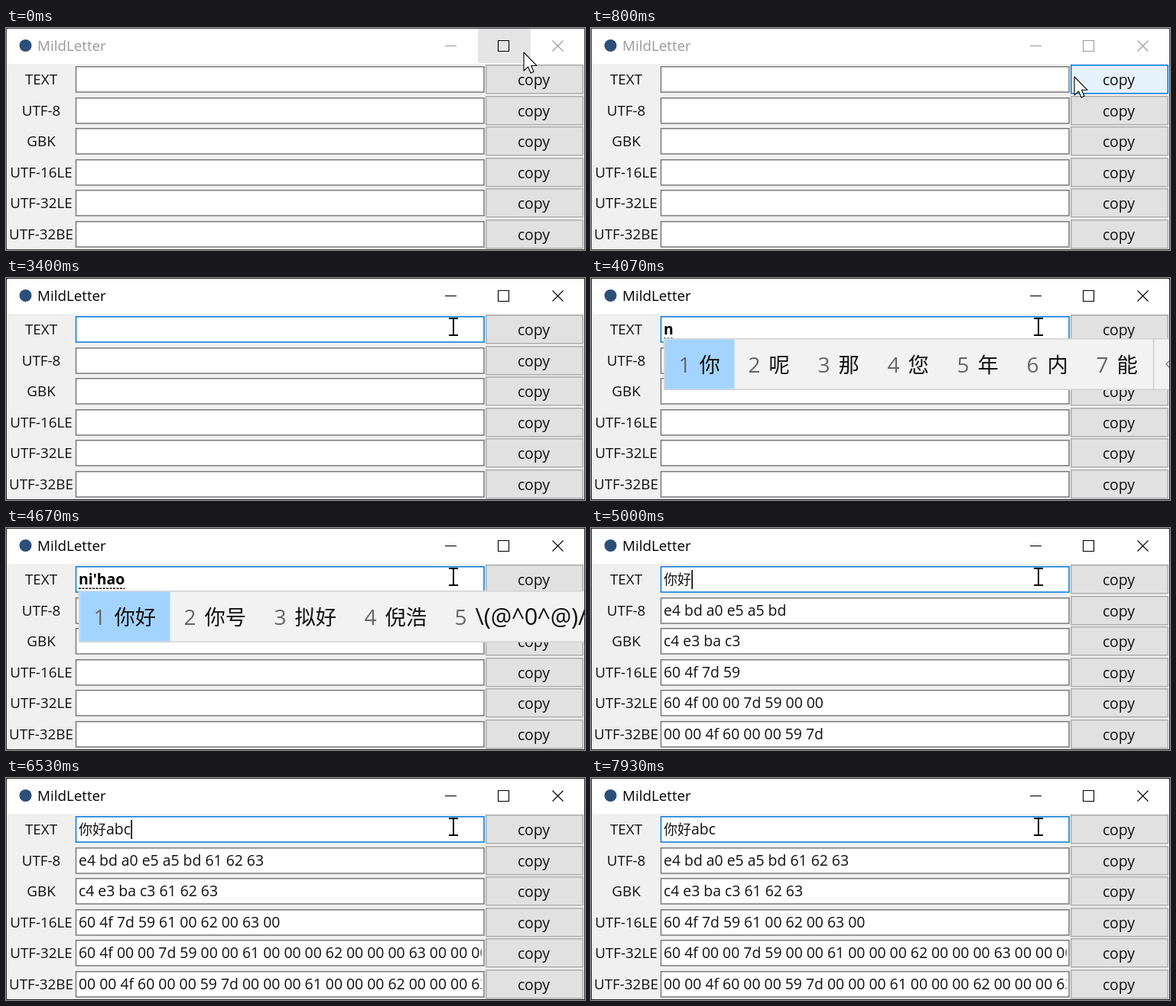
Recreate the animation shown at these times as an HTML page. Size 757 by 291 pixels, loop 8000 ms.

```html
<!DOCTYPE html>
<html lang="en">
<head>
<meta charset="utf-8">
<title>Text encodings</title>
<style>
  html, body { margin: 0; width: 100%; height: 100%; overflow: hidden; background: #f0f0f0; }
  svg { display: block; width: 757px; height: 291px; }
  text { font-family: "Open Sans", "Noto Sans CJK SC", "Noto Sans CJK", sans-serif; white-space: pre; }
</style>
</head>
<body>
<svg id="stage" viewBox="0 0 757 291"></svg>
<script>
const LOOP = 8000;
const LABELS = ['TEXT', 'UTF-8', 'GBK', 'UTF-16LE', 'UTF-32LE', 'UTF-32BE'];
const INK = '#111';
const stage = document.getElementById('stage');

function add(parent, tag, attrs = {}, content = '') {
  const node = document.createElementNS('http://www.w3.org/2000/svg', tag);
  set(node, attrs);
  node.textContent = content;
  return parent.appendChild(node);
}
function set(node, attrs) {
  for (const key in attrs) node.setAttribute(key, attrs[key]);
}
function show(node, visible) {
  node.setAttribute('display', visible ? 'inline' : 'none');
}

// Encoders
const hex = bytes => Array.from(bytes, b => b.toString(16).padStart(2, '0')).join(' ');
const GBK = { '你': [0xc4, 0xe3], '好': [0xba, 0xc3] };
const wide = (text, size) => [...text].flatMap(ch =>
  Array.from({ length: size }, (_, i) => (ch.codePointAt(0) >> (8 * i)) & 255));
function encodeAll(text) {
  const le = wide(text, 4);
  return [
    new TextEncoder().encode(text),
    [...text].flatMap(ch => GBK[ch] || [ch.charCodeAt(0)]),
    wide(text, 2),
    le,
    le.map((_, i) => le[(i & ~3) + 3 - (i & 3)])
  ].map(hex);
}

// Timelines: each entry holds from its time until the next
const TYPED = [[0, ''], [4930, '你好'], [5800, '你好a'], [6130, '你好ab'], [6470, '你好abc']];
const ENCODED = [[0, ''], [5000, '你好'], [5800, '你好a'], [6130, '你好ab'], [6530, '你好abc']];
const CARET = [[0, false], [1870, true], [2470, false], [2800, true], [3400, false], [3670, true],
  [4070, false], [4930, true], [5200, false], [5530, true], [7070, false], [7330, true], [7930, false]];
const COMPOSING = [
  [0, null],
  [4070, { pinyin: 'n', y: 79, words: '你 呢 那 您 年 内 能' }],
  [4130, { pinyin: 'ni', y: 82, words: '你 呢 尼 拟 泥 妮 逆' }],
  [4470, { pinyin: "ni'h", y: 82, words: '你好 你会 你还 你和 你很 你ha' }],
  [4530, { pinyin: "ni'ha", y: 82, words: '你哈 你好 拟好 尼哈 你还 泥哈' }],
  [4670, { pinyin: "ni'hao", y: 82, words: '你好 你号 拟好 倪浩 \\(@^0^@)/' }],
  [4930, null]
];
const IBEAM_Y = [[0, 72], [1270, 70], [1330, 68], [1470, 66], [1530, 64]];
const at = (line, t) => line.findLast(([start]) => start <= t)[1];

// Title bar
add(stage, 'rect', { width: 757, height: 291, fill: '#f0f0f0' });
add(stage, 'rect', { width: 757, height: 47, fill: '#fff' });
add(stage, 'circle', { cx: 25.5, cy: 23, r: 8, fill: '#2c4f78' });
const title = add(stage, 'text', { x: 41, y: 30, 'font-size': 18.8 }, 'MildLetter');
const maxHover = add(stage, 'rect', { x: 617, y: 1, width: 69, height: 45, fill: '#e5e5e5' });
const icon = d => add(stage, 'path', { d, fill: 'none', 'stroke-width': 1.1 });
const minIcon = icon('M574 23.5h15');
const maxIcon = icon('M643.5 16.5h14v14h-14z');
const closeIcon = icon('M714.5 16.5l14 14m0-14l-14 14');

// Rows
const clip = add(add(stage, 'defs'), 'clipPath', { id: 'entryClip' });
add(clip, 'rect', { x: 94, y: 48, width: 527.5, height: 243 });
const rows = LABELS.map((label, i) => {
  const y = Math.round(40.5 * i);
  add(stage, 'text', { x: 46, y: 74 + y, 'font-size': 18.8, 'text-anchor': 'middle', fill: INK }, label);
  const entry = add(stage, 'rect', { x: 91.5, y: 50.75 + y, width: 533.5, height: 33.25,
    fill: '#fff', stroke: '#7a7a7a', 'stroke-width': 1.5 });
  const value = add(add(stage, 'g', { 'clip-path': 'url(#entryClip)' }), 'text',
    { x: 95, y: 74 + y, 'font-size': 19.4, fill: INK });
  const button = add(stage, 'rect', { x: 627.75, y: 48.75 + y, width: 126.5, height: 37,
    fill: '#e1e1e1', stroke: '#adadad', 'stroke-width': 1.5 });
  add(stage, 'text', { x: 690, y: 75 + y, 'font-size': 19.4, 'text-anchor': 'middle', fill: INK }, 'copy');
  return { entry, value, button };
});
const typedCjk = add(rows[0].value, 'tspan', { 'font-size': 18 });
const typedLatin = add(rows[0].value, 'tspan');
const caret = add(stage, 'rect', { y: 55, width: 1.6, height: 25, fill: '#000' });

// Input method
const ime = add(stage, 'g');
const pinyin = add(ime, 'text', { x: 95, y: 73.5, 'font-size': 19.4, 'font-weight': 700, fill: '#000' });
const underline = add(ime, 'path', { stroke: '#000', 'stroke-width': 1.5, 'stroke-dasharray': '3 1.5' });
const popup = add(ime, 'g');

function drawPopup({ y, words }) {
  popup.textContent = '';
  set(popup, { transform: `translate(95 ${y})` });
  add(popup, 'rect', { x: 0.75, y: 0.75, width: 700, height: 66.5, fill: '#f2f2f2',
    stroke: '#d2d2d2', 'stroke-width': 1.5 });
  let x = 1.5;
  words.split(' ').forEach((word, i) => {
    const width = 64 + 27 * word.length;
    if (!i) add(popup, 'rect', { x, y: 1.5, width, height: 65, fill: '#a3d4ff' });
    add(popup, 'text', { x: x + 18, y: 44.5, 'font-size': 28, fill: '#666' }, i + 1);
    add(popup, 'text', { x: x + 45, y: 44.5, 'font-size': word[0] === '\\' ? 30.5 : 27.3, fill: INK }, word);
    x += width;
  });
  if (words.split(' ').length === 7) {
    add(popup, 'path', { d: 'M640.5 1v66', stroke: '#d2d2d2', 'stroke-width': 1.5 });
    add(popup, 'path', { d: 'M663 28l-6 6 6 6', fill: 'none', stroke: '#888', 'stroke-width': 1.5 });
  }
}

const frame = add(stage, 'rect', { x: 0.5, y: 0.5, width: 756, height: 290, fill: 'none' });

// Pointers
const arrow = add(stage, 'path', { d: 'M0 0V24L5.5 18.8 9 27 13 25.3 9.5 17.3H17Z',
  fill: '#fff', stroke: '#000', 'stroke-width': 1.1, 'stroke-linejoin': 'round' });
const ibeam = add(stage, 'path', { d: 'M-6 -11H6M-6 11H6M0 -11V11',
  stroke: '#000', 'stroke-width': 2 });

function pointerAt(t) {
  const step = t < 470 ? 0 : Math.min(11, Math.floor((t - 470) / 66) + 1);
  const u = step / 11;
  const s = u * u * (3 - 2 * u);
  const bend = (a, b, c) => a * (1 - s) ** 2 + 2 * b * s * (1 - s) + c * s * s;
  return { x: bend(677, 645, 585), y: step < 11 ? bend(32, 70, 72) : at(IBEAM_Y, t) };
}

let shownComposition = null;
function render(t) {
  const focused = t >= 1870;
  const pointer = pointerAt(t);
  const overMax = pointer.y < 46;
  const overEntry = pointer.x < 626;
  const overButton = !overEntry && pointer.y > 48;
  const chrome = focused ? '#000' : '#999';

  set(title, { fill: chrome });
  set(minIcon, { stroke: chrome });
  set(closeIcon, { stroke: chrome });
  set(maxIcon, { stroke: overMax ? '#000' : chrome });
  show(maxHover, overMax);
  set(frame, { stroke: focused ? '#262626' : '#484848' });

  set(rows[0].entry, { stroke: focused ? '#0078d7' : overEntry ? '#171717' : '#7a7a7a' });
  set(rows[0].button, overButton
    ? { fill: '#e5f1fb', stroke: '#0078d7' }
    : { fill: '#e1e1e1', stroke: '#adadad' });

  const typed = at(TYPED, t);
  typedCjk.textContent = typed.slice(0, 2);
  typedLatin.textContent = typed.slice(2);
  encodeAll(at(ENCODED, t)).forEach((bytes, i) => { rows[i + 1].value.textContent = bytes; });
  const typedWidth = typed ? rows[0].value.getComputedTextLength() : 0;
  set(caret, { x: 95.4 + typedWidth });
  show(caret, at(CARET, t));

  const composition = at(COMPOSING, t);
  show(ime, composition);
  if (composition && composition !== shownComposition) {
    pinyin.textContent = composition.pinyin;
    set(underline, { d: `M95 79.25h${pinyin.getComputedTextLength()}` });
    drawPopup(composition);
  }
  shownComposition = composition;

  show(arrow, !overEntry);
  show(ibeam, overEntry);
  set(overEntry ? ibeam : arrow, {
    transform: `translate(${Math.round(pointer.x)} ${Math.round(pointer.y)})`
  });
}

const start = performance.now();
function tick() {
  render((performance.now() - start) % LOOP);
  requestAnimationFrame(tick);
}
tick();
</script>
</body>
</html>
```
